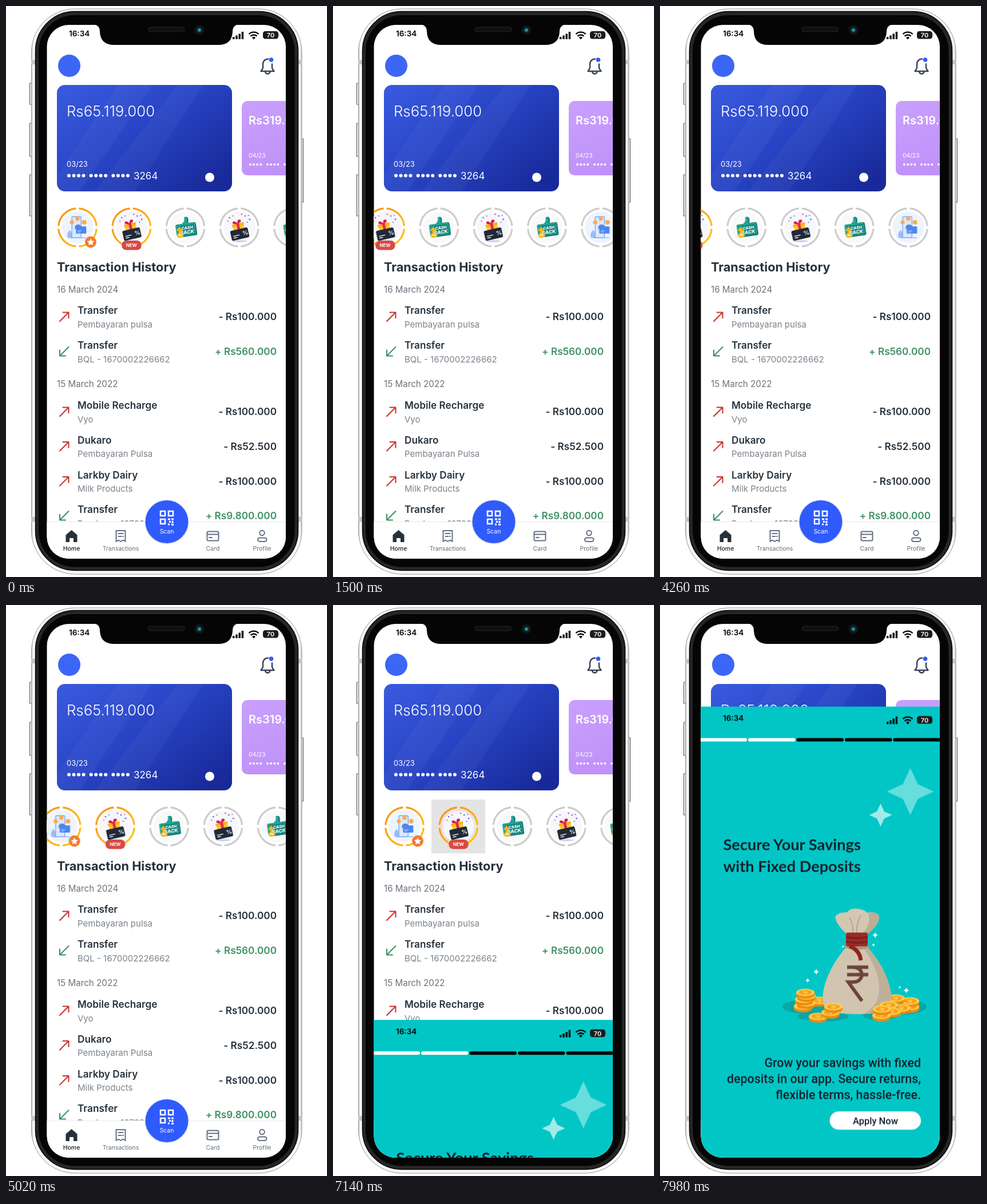
Write an HTML page that moves like this. It is 561 px wide and 998 px high and loops after 8 s.

```html
<!DOCTYPE html>
<html lang="en">
<head>
<meta charset="utf-8">
<title>Banking app</title>
<style>
html, body { margin: 0; width: 100%; height: 100%; overflow: hidden; background: #fff; }
svg { display: block; width: 100vw; height: 100vh; font-family: Inter, sans-serif; }
.mid { text-anchor: middle; }
.end { text-anchor: end; }
.date { font-size: 15.2px; fill: #6b737d; }
.name { font-size: 17.2px; font-weight: 600; fill: #27323c; }
.sub { font-size: 15px; fill: #7b838c; }
.nav { font-size: 10.5px; fill: #646c7c; text-anchor: middle; }
.line { fill: none; stroke-width: 2; stroke-linecap: round; stroke-linejoin: round; }

#strip { animation: strip 8s infinite; }
#press { animation: press 8s linear infinite; }
#touch { animation: touch 8s ease-out infinite; transform-box: fill-box; transform-origin: center; }
#sheet { animation: sheet 8s infinite; }

@keyframes strip {
  0%, 6% { transform: translateX(0); animation-timing-function: cubic-bezier(.364, 0, .636, 1); }
  31%, 43.25% { transform: translateX(-248.3px); animation-timing-function: cubic-bezier(.364, 0, .636, 1); }
  68.25%, 100% { transform: translateX(0); }
}
@keyframes press { 0%, 75% { opacity: 0; } 77%, 100% { opacity: 1; } }
@keyframes touch {
  0%, 68.5% { opacity: 0; transform: scale(1.15); }
  74%, 76.75% { opacity: 1; transform: scale(1); }
  79%, 100% { opacity: 0; transform: scale(1.1); }
}
/* the slide-up is still under way when the loop restarts */
@keyframes sheet {
  0%, 80.375% { transform: translateY(940.5px); animation-timing-function: cubic-bezier(.368, 0, .666, .676); }
  100% { transform: translateY(140.5px); }
}
</style>
</head>
<body>
<svg viewBox="0 0 561 998" xmlns="http://www.w3.org/2000/svg">
<defs>
  <clipPath id="screen"><rect x="71.5" y="33" width="417.5" height="933" rx="38"/></clipPath>
  <clipPath id="blueClip"><rect x="89" y="138" width="306" height="186" rx="14"/></clipPath>
  <linearGradient id="steel">
    <stop offset="0" stop-color="#b8b8b8"/><stop offset=".006" stop-color="#f8f8f8"/>
    <stop offset=".994" stop-color="#f8f8f8"/><stop offset="1" stop-color="#b8b8b8"/>
  </linearGradient>
  <linearGradient id="blue" x2="1" y2=".8">
    <stop offset="0" stop-color="#3a5be0"/><stop offset=".5" stop-color="#2844c4"/><stop offset="1" stop-color="#182a9a"/>
  </linearGradient>
  <linearGradient id="violet" x2=".6" y2="1">
    <stop offset="0" stop-color="#c8a0fd"/><stop offset="1" stop-color="#bf8ef8"/>
  </linearGradient>
  <linearGradient id="gold" x2="1" y2="1">
    <stop offset="0" stop-color="#fb8c10"/><stop offset="1" stop-color="#ffc80a"/>
  </linearGradient>

  <g id="status">
    <text x="110" y="52.5" font-size="13.5" font-weight="600">16:34</text>
    <path d="M396 54h3.4v4h-3.4zM401.3 51.5h3.4v6.5h-3.4zM406.5 48.5h3.4v9.5h-3.4zM411.7 45h3.4v13h-3.4z"/>
    <path d="M424.5 49.2a12 12 0 0 1 17 0M427.5 52.7a8 8 0 0 1 11 0" fill="none" stroke="#000" stroke-width="2.4"/>
    <path d="M433 58.5l-3-3.2a4.3 4.3 0 0 1 6 0z"/>
    <rect x="449" y="44" width="27" height="13.5" rx="4.3" fill="#1b1b1b"/>
    <path d="M477 48.5q1.8 2.2 0 4.5z" fill="#777"/>
    <text class="mid" x="462.5" y="55" font-size="11" font-weight="600" fill="#fff">70</text>
  </g>

  <g id="phone">
    <circle r="27.5" fill="#edf4fe"/>
    <g transform="scale(.9)">
      <path d="M-19 20q-3-9 4-15q6 7 4 16z" fill="#9dbcf5"/>
      <rect x="-11" y="-21" width="18" height="41" rx="2.5" fill="#d9e8ff" stroke="#6e9cf2" stroke-width="1.3"/>
      <path d="M-5-2q6-8 14 1l-3 5q-6-6-11 0z" fill="#5b83d8"/>
      <rect x="-3" y="-2" width="20" height="14" rx="1.5" fill="#4a86f2"/>
      <path d="M0 6.5h8M0 9h5" stroke="#cfe1ff"/>
      <g fill="#ffa94a"><circle cx="-11" cy="-10" r="4"/><circle cx="0" cy="-17" r="4"/><circle cx="13" cy="-10" r="4.5"/></g>
      <path d="M-14 20h30" stroke="#8fb2f3" stroke-width="1.5"/>
    </g>
  </g>

  <g id="gift">
    <circle r="27.5" fill="#f6f6fc"/>
    <ellipse cy="24" rx="13" ry="1.5" fill="#c9c9ee"/>
    <g fill="#4d5be8"><circle cx="-17" cy="-17" r="1.2"/><circle cx="10" cy="-20" r="1.2"/><circle cx="18" cy="-14" r="1.3"/><circle cx="14" cy="-9" r="1"/></g>
    <g fill="#e8436a"><circle cx="-11" cy="-20" r="1.1"/><circle cx="4" cy="-23" r="1.2"/><circle cx="16" cy="-21" r="1.1"/><circle cx="-20" cy="-11" r="1"/></g>
    <g transform="scale(.92) rotate(-13)">
      <rect x="-12" y="-7" width="21" height="14" fill="#ffc62c"/>
      <rect x="-13" y="-8" width="23" height="5" fill="#ffb01b"/>
      <path d="M-4-8h5v15h-5z" fill="#e32552"/>
      <path d="M-2-7q-11-1-8-6q5-2 8 5q1-9 7-6q4 4-7 7z" fill="#d51f49"/>
      <rect x="-19" y="3" width="34" height="19" rx="2.5" fill="#202937"/>
      <path d="M-15 14h12M-15 17.5h7" stroke="#fff" stroke-width="1.5"/>
    </g>
    <text class="mid" x="10.500" y="13" font-size="10" font-weight="700" fill="#fff" transform="rotate(-9 11 10)">%</text>
  </g>

  <g id="cash">
    <circle r="27.5" fill="#f8f9fa"/>
    <g transform="rotate(-8)">
      <path d="M-13-6h9q6-4 5-12q6-1 6 5l-1 6h10q3 0 3 3v17q0 3-3 3h-29q-3 0-3-3v-16q0-3 3-3z" fill="#0c726d"/>
      <path d="M-14-7h9q6-4 5-11q5 0 5 5l-1 6h10q3 0 3 3v15q0 3-3 3h-28q-3 0-3-3v-15q0-3 3-3z" fill="#21a598"/>
      <path d="M-13-4h28v17h-28z" fill="#128379"/>
      <g class="mid" fill="#fff" font-weight="800" font-style="italic"><text x="3" y="3.5" font-size="7">CASH</text><text x="2" y="11.5" font-size="8.5">BACK</text></g>
    </g>
    <path d="M-12 13v-7h-4l6-8 5 8h-3v7z" fill="#f7b519"/>
    <ellipse cx="-9" cy="14" rx="6" ry="4" fill="#f9bd27"/><ellipse cx="-9" cy="13" rx="3.5" ry="2" fill="#ffe07a"/>
  </g>

  <path id="spark" d="M0-41L13-13 41 0 13 13 0 41-13 13-41 0-13-13z"/>
  <g id="coin">
    <path d="M-16 0v4.5a16 6.5 0 0 0 32 0v-4.5z" fill="#ec8b13"/>
    <ellipse rx="16" ry="6.5" fill="#ffd04b"/>
    <ellipse rx="11.5" ry="4.3" fill="#f6a01d"/>
    <path d="M-4-1.5h8M-4 .5h7l-4 2.5" fill="none" stroke="#ffdc6b" stroke-width="1.2"/>
  </g>
  <g id="up" class="line" stroke="#c9302c"><path d="M-7.5 8L8-7.5M-2-7.5H8V2.5"/></g>
  <g id="down" class="line" stroke="#3a8d62"><path d="M8-8L-7.5 7.5M-7.5-2.5V7.5H2.5"/></g>
</defs>

<!-- handset -->
<g fill="#eee" stroke="#555">
  <path d="M45 135h-3.5v37h3.5zM45 205h-3.5v58h3.5zM45 295h-3.5v72h3.5zM516 232h3.5v111h-3.5z"/>
  <rect x="44.5" y="5" width="472.5" height="988" rx="76" fill="url(#steel)" stroke="#999"/>
</g>
<path d="M44 94h7v8h-7zM510 94h7v8h-7zM44 893h7v8.5h-7zM510 893h7v8.5h-7z" fill="#c5c5c5"/>
<rect x="51.5" y="9.5" width="459" height="977" rx="69" fill="#262626" stroke="#050505" stroke-width="1.5"/>
<rect x="57" y="16" width="447.5" height="964.5" rx="63" fill="#050505"/>

<g clip-path="url(#screen)">
  <path d="M70 30h421v940H70z" fill="#fff"/>
  <use href="#status"/>
  <circle cx="110.5" cy="104.5" r="19.5" fill="#3c66f6"/>
  <path class="line" d="M458 92.5q-9 .5-9 10v5q0 2-3.500 6.500h23q-3.500-4.500-3.500-6.500v-6M453 115q1 3.500 4.300 3.500t4.300-3.500" stroke="#3a4457" style="stroke-width:2.5"/>
  <circle cx="463.5" cy="94" r="3.8" fill="#2f5bff"/>

  <g clip-path="url(#blueClip)" fill="#fff">
    <path d="M89 138h306v186H89z" fill="url(#blue)"/>
    <path d="M195 138h60L130 324H70zM300 138h45L225 324h-70z" opacity=".035"/>
    <text x="106" y="192.5" font-size="25.8" font-weight="300">Rs65.119.000</text>
    <text x="106" y="280.5" font-size="13">03/23</text>
    <g id="dots"></g>
    <text x="223" y="302.5" font-size="17">3264</text>
    <circle cx="356" cy="299.5" r="8"/>
  </g>

  <g fill="#fff">
    <rect x="412" y="166" width="220" height="130" rx="10" fill="url(#violet)"/>
    <text x="424" y="207" font-size="20" font-weight="600">Rs319.000</text>
    <text x="424" y="264.5" font-size="10.3">04/23</text>
    <g id="dots2"></g>
  </g>

  <path id="press" d="M172 340h94v94h-94z" fill="#e4e4e4"/>
  <g id="strip"></g>
  <circle id="touch" cx="219" cy="391.5" r="15.5" fill="#a3a3a3" stroke="#414141" stroke-width="4"/>

  <text x="89" y="464" font-size="21.7" font-weight="700" fill="#27323c">Transaction History</text>
  <text class="date" x="89" y="500.5">16 March 2024</text>
  <text class="date" x="89" y="666">15 March 2022</text>
  <g id="rows"></g>

  <path d="M70 902h421v70H70z" fill="#fff"/>
  <path d="M70 901.5h421" stroke="#e9eaec"/>
  <circle cx="281" cy="902" r="39" fill="#e4e7f2"/>
  <circle cx="281" cy="901.5" r="37.5" fill="#305bfc"/>
  <g fill="none" stroke="#fff" stroke-width="2.5">
    <path d="M270 883h8v8h-8zM284 883h8v8h-8zM270 897h8v8h-8z"/>
    <path d="M283 897h4M289 897h4M285 901.5h3M291 900v4M283 906h3M289 906.5h4" stroke-width="3"/>
  </g>
  <text class="mid" x="281" y="922" font-size="10.4" fill="#fff">Scan</text>
  <path d="M114.5 916l10 8.5v12.5h-6.5v-7h-7v7h-6.5v-12.5z" fill="#25313b"/>
  <g class="line" stroke="#667085">
    <path d="M192.5 917h16v19l-4-2.5-4 2.5-4-2.5-4 2.5zM196.5 922h8M196.5 927h5M204 927h1"/>
    <rect x="351.5" y="918.5" width="20" height="16" rx="2"/><path d="M352 923.5h19M355 929h5"/>
    <circle cx="447.5" cy="921" r="4.3"/><rect x="440" y="929.5" width="15.5" height="6.5" rx="3.2"/>
  </g>
  <g class="nav">
    <text x="114.5" y="951.5" fill="#18222b" font-weight="500">Home</text>
    <text x="200.5" y="951.5">Transactions</text>
    <text x="361.5" y="951.5">Card</text>
    <text x="447.5" y="951.5">Profile</text>
  </g>

  <!-- offer sheet, laid out in its resting place -->
  <g id="sheet">
    <path d="M70 27.5h421v960H70z" fill="#02c6c6"/>
    <use href="#status"/>
    <g id="steps"></g>
    <g fill="#fff">
      <use href="#spark" transform="translate(437.5 176)" opacity=".4"/>
      <use href="#spark" transform="translate(385.5 217) scale(.49)" opacity=".63"/>
    </g>
    <g font-family="Lato, sans-serif" font-size="27.2" font-weight="700" fill="#13222c">
      <text x="110.5" y="278.5">Secure Your Savings</text><text x="110.5" y="316.5">with Fixed Deposits</text>
    </g>

    <g fill="#08a6a7">
      <ellipse cx="264" cy="552" rx="50" ry="13"/><ellipse cx="418" cy="552" rx="48" ry="14"/><ellipse cx="285" cy="569" rx="45" ry="9"/><ellipse cx="385" cy="567" rx="30" ry="9"/>
    </g>
    <g id="back"></g>
    <path d="M326 425Q304 404 307 393q8-7 20-6q6-8 20-6q12 2 15 7q13-4 21 5q1 16-21 32z" fill="#d3c7b2"/>
    <path d="M352 425q18-15 12-36q12-5 19 4q1 16-21 32z" fill="#bcae95"/>
    <path d="M331 396q7 12 6 28M351 392q-8 14-7 32" fill="none" stroke="#b7a88f" stroke-width="2"/>
    <path d="M327 446h34q34 38 42 78q4 29-14 37q-44 8-92 0q-17-8-11-39q8-38 41-76z" fill="#d2c5af"/>
    <path d="M352 446h9q34 38 42 78q4 29-14 37q-15 3-31 3q31-20 24-56q-5-32-30-62z" fill="#beb098"/>
    <path d="M326 440q18 7 35 0l5 8q-23 9-44 0z" fill="#a79880"/>
    <rect x="325" y="422.5" width="38" height="24" rx="3" fill="#9d2a25"/>
    <path d="M325 430q18 5 38 0M325 438q18 5 38 0" fill="none" stroke="#6f1b1b" stroke-width="2"/>
    <path d="M331 446q18 7 20 25" fill="none" stroke="#8f2420" stroke-width="7"/>
    <path d="M327 483h37M327 496h37M327 483h10c21 0 21 26 0 26h-8l24 33" fill="none" stroke="#6b4339" stroke-width="6"/>
    <g id="front"></g>
    <g id="glints" fill="#fff"></g>

    <g class="end" font-family="Roboto, sans-serif" font-weight="500" font-size="21.4" fill="#13222c">
      <text x="456" y="657">Grow your savings with fixed</text>
      <text x="456" y="685">deposits in our app. Secure returns,</text>
      <text x="456" y="713">flexible terms, hassle-free.</text>
    </g>
    <rect x="296.5" y="735" width="159.5" height="32" rx="16" fill="#fff"/>
    <text class="mid" x="376.5" y="757.5" font-family="Roboto, sans-serif" font-weight="500" font-size="16.5" fill="#13222c">Apply Now</text>
  </g>
</g>

<!-- notch -->
<path d="M152 32q12 1 12 13q1 23 25 23h182q24 0 25-23q0-12 12-13z" fill="#050505"/>
<rect x="248" y="37" width="64" height="8" rx="4" fill="#101010" stroke="#232323"/>
<circle cx="338" cy="42" r="8.5" fill="#111517"/>
<circle cx="338" cy="42" r="4.5" fill="#0c3b43"/>
<circle cx="338" cy="42" r="2.6" fill="#2b97a3"/>
</svg>

<script>
const fill = (id, list, draw) => { document.getElementById(id).innerHTML = list.map(draw).join(''); };
const range = n => [...Array(n).keys()];

const dots = (x, y, gap, group, r) => i =>
  `<circle cx="${x + (i % 4) * gap + Math.floor(i / 4) * group}" cy="${y}" r="${r}"/>`;
fill('dots', range(12), dots(110, 296.5, 8.5, 38.7, 3));
fill('dots2', range(12), dots(427, 277, 6.1, 30, 2));

const badges = [
  `<circle cx="23" cy="25.5" r="10" fill="#f47a31"/>
   <path d="M23 19.5l1.9 3.9 4.3.6-3.1 3 .7 4.3-3.8-2-3.8 2 .7-4.3-3.1-3 4.3-.6z" fill="#fff"/>`,
  `<rect x="-17" y="23" width="34.5" height="16.5" rx="8" fill="#d94a43"/>
   <text class="mid" x="0" y="34" font-size="8" font-weight="700" fill="#fff">NEW</text>`
];
fill('strip', ['phone', 'gift', 'cash', 'gift', 'cash', 'phone', 'cash'], (icon, i) =>
  `<g transform="translate(${125 + i * 94.25} 387)">
    <use href="#${icon}"/>
    <circle r="33.3" fill="none" stroke="${i < 2 ? 'url(#gold)' : '#cbcbcb'}" stroke-width="3.2"
      pathLength="400" stroke-dasharray="90 10" stroke-dashoffset="-5"/>
    ${badges[i] || ''}
  </g>`);

const rows = [
  [538, 'Transfer', 'Pembayaran pulsa', '- Rs100.000'],
  [599, 'Transfer', 'BQL - 1670002226662', '+ Rs560.000'],
  [704, 'Mobile Recharge', 'Vyo', '- Rs100.000'],
  [764.5, 'Dukaro', 'Pembayaran Pulsa', '- Rs52.500'],
  [825.5, 'Larkby Dairy', 'Milk Products', '- Rs100.000'],
  [886, 'Transfer', 'Randoru - 1672200148', '+ Rs9.800.000']
];
fill('rows', rows, ([y, name, sub, sum]) => {
  const plus = sum[0] === '+';
  return `<use href="#${plus ? 'down' : 'up'}" x="101.5" y="${y + 5}"/>
    <text class="name" x="125" y="${y}">${name}</text>
    <text class="sub" x="125" y="${y + 23.5}">${sub}</text>
    <text class="name end" x="473" y="${y + 11}"${plus ? ' style="fill:#3f9166"' : ''}>${sum}</text>`;
});

fill('steps', range(5), i =>
  `<rect x="${69.5 + i * 84.5}" y="82.5" width="82.5" height="6" rx="3" fill="${i < 2 ? '#fff' : '#000'}"/>`);

const coin = ([x, y]) => `<use href="#coin" x="${x}" y="${y}"/>`;
fill('back', [[278, 541], [250, 551], [256, 545], [252, 539], [256, 533], [254, 527],
  [437, 552], [437, 542], [412, 537]], coin);
fill('front', [[276, 569], [298, 562], [303, 552], [422, 554], [400, 549], [405, 560], [387, 567], [388, 556]], coin);
fill('glints', [[376, 427, 5], [373, 444, 3], [320, 447, 2.5], [273, 491, 5], [258, 506, 4], [419, 518, 2.5], [430.5, 523.5, 5]],
  ([x, y, r]) => `<use href="#spark" transform="translate(${x} ${y}) scale(${r / 41})"/>`);
</script>
</body>
</html>
```
